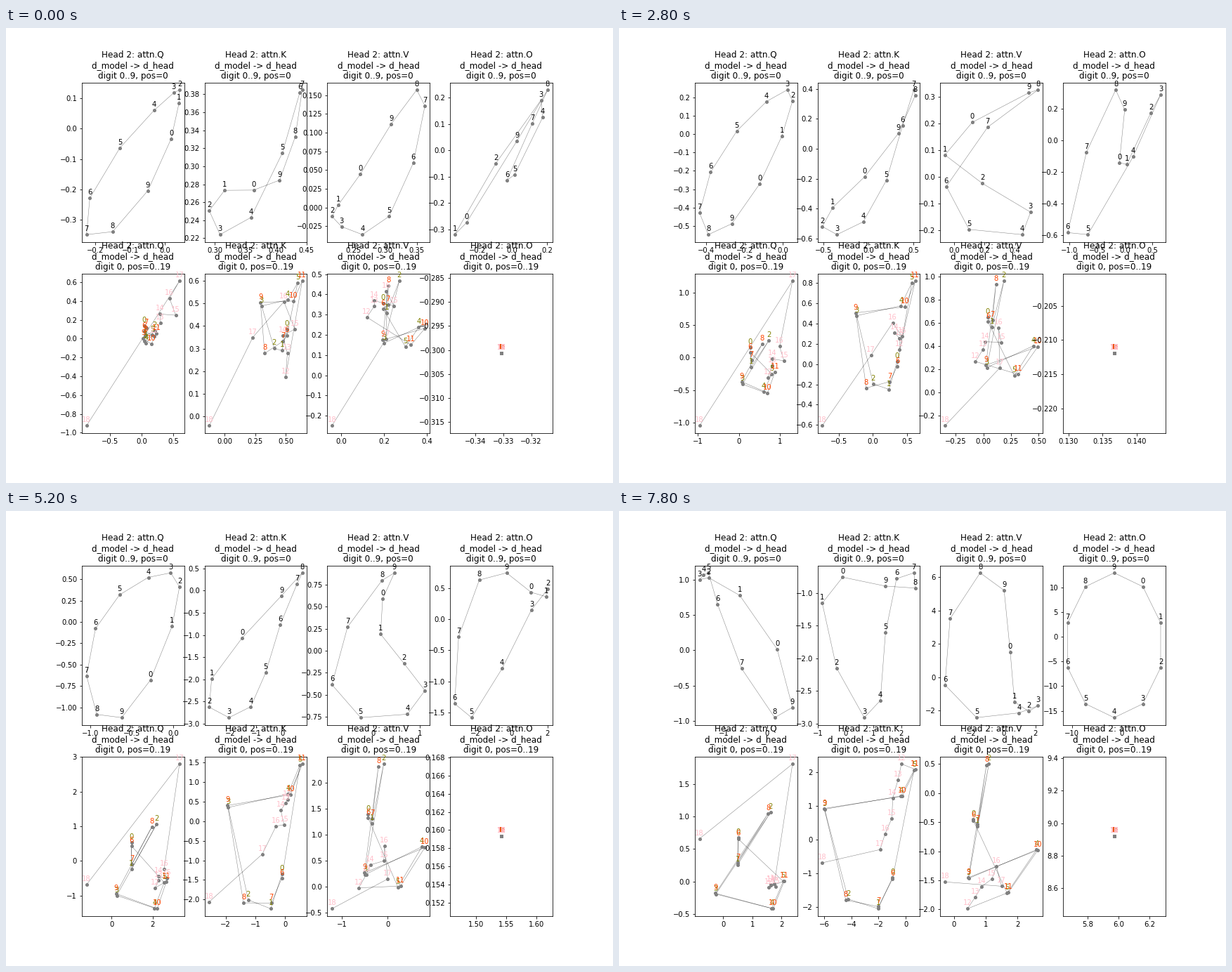
These frames come from a looping animation (864 by 648 pixels, 8 s). A matplotlib script:

```python
import matplotlib.pyplot as plt
import numpy as np
from matplotlib.animation import FuncAnimation

STEPS = 40
KEYS = (0, 22, 39)  # start, turning point and end of the loop
NAMES = "QKVO"


def wave(peak, ratio=0, peak2=0):
    """One cycle over the ten digits plus a weaker double cycle."""
    d = np.arange(10)
    turn = np.pi / 5
    return np.cos(turn * (d - peak)) + ratio * np.cos(2 * turn * (d - peak2))


def ring(x, y):
    return unit(wave(*x) + 1j * wave(*y))


def unit(z):
    """Stretch points to fill the unit square."""
    def norm(v):
        return (v - v.min()) / (np.ptp(v) or 1)
    return norm(z.real) + 1j * norm(z.imag)


# Shape of the digit ring at each key
RINGS = {
    "Q": (ring((1.6, .2, 4.1), (2.4, .14, 0)),
          ring((2.4, .06, 1.6), (3.5, .11, 1.7)),
          ring((8.9, .27, 4.2), (3.4, .36, .8))),
    "K": (ring((7, .14, -.2), (7, .5, 1.3)),
          ring((7.2, .22, 3.7), (7.8, .21, 3)),
          ring((6.6, .4, 3.2), (8.2, .5, .8))),
    "V": (ring((7, .05, 2.7), (8, .29, 2.6)),
          ring((1.9, 1.13, 3.4), (9.3, .11, 2.9)),
          ring((1.8, .43, 3.6), (8.3, .42, 3.2))),
    "O": (ring((5.7, 1.26, 3.2), (5.8, 2.2, 3.1)),
          ring((1.4, .07, 3.2), (.5, .64, 2.9)),
          ring((1.5,), (9,))),
}

# Data limits at each key: left, right, bottom, top
LIMITS = {
    "Q0": ((-.225, .042, -.348, .127), (-1.037, .07, -1.122, .569), (-1.555, .58, -.952, 1.094)),
    "K0": ((.291, .443, .224, .385), (-2.83, .745, -2.868, .418), (-.84, 2.5, -2.911, -.688)),
    "V0": ((.216, .363, -.036, .157), (-.853, 1.093, -.737, .814), (-3.64, 2.16, -2.43, 6.25)),
    "O0": ((-.331, .204, -.32, .229), (-3.05, 1.925, -1.391, .59), (-10.84, 7.94, -16.38, 12.93)),
    "Q1": ((-.876, .602, -.926, .613), (-1.212, 3.318, -1.396, 2.812), (-.803, 2.377, -.42, 1.806)),
    "K1": ((-.128, .636, -.04, .598), (-2.505, .572, -2.24, 1.457), (-6.15, .705, -2.045, 2.234)),
    "V1": ((-.043, .391, -.25, .467), (-1.229, .791, -.404, 2.382), (-.289, 2.65, -1.987, .5)),
    "O1": ((-.3307, -.3307, -.3007, -.3007), (1.483, 1.483, .0437, .0437), (5.972, 5.972, 8.919, 8.919)),
}


def chain(loop, tail, noise):
    """Twelve positions run twice round a loop, the other seven trail off."""
    path = np.interp(range(12, 19), (12, 16, 17, 18), tail)
    z = np.concatenate([loop, loop, path])
    rng = np.random.default_rng(4)
    z[:17] += noise * (rng.normal(size=17) + 1j * rng.normal(size=17))
    return unit(z)


def growth(center, scale, loop, early, late):
    """The loop starts as a small knot and opens to its full size."""
    loop = np.array(loop)
    knot = center + scale * (loop - loop.mean())
    return chain(knot, early, .03), chain(loop, late, .008)


CHAINS = {
    "Q": growth(.66 + .63j, .14,
                (.42 + .48j, .41 + .3j, .75 + .67j, .17 + .1j, .79, .9 + .18j),
                (.72 + .68j, .95 + .85j, 1 + 1j, 0),
                (.74 + .16j, .82 + .16j, 1 + 1j, .48j)),
    "K": growth(.75 + .63j, .4,
                (.77 + .2j, .61, .27 + .07j, .02 + .68j, .87 + .77j, 1 + .94j),
                (.78 + .35j, .83 + .7j, .45 + .52j, 0),
                (.86 + 1j, .7 + .5j, .63 + .4j, .31j)),
    "V": growth(.57 + .68j, .5,
                (.31 + .6j, .35 + .56j, .46 + 1j, .25 + .2j, 1 + .4j, .67 + .09j),
                (.3 + .75j, .54 + .82j, .48 + .55j, 0),
                (.24, .57 + .27j, .61 + .14j, .17j)),
    "O": (np.zeros(19, complex),) * 2,
}


def mix(a, b, t):
    return (1 - t) * a + t * b


def place(row, name, step):
    k = int(step >= KEYS[1])
    t = (step - KEYS[k]) / (KEYS[k + 1] - KEYS[k])
    if row == 0:
        z = mix(*RINGS[name][k:k + 2], t)
    else:
        z = mix(*CHAINS[name], step / KEYS[-1])
    z = unit(z)
    left, right, low, high = mix(*np.array(LIMITS[f"{name}{row}"])[k:k + 2], t ** 3)
    return left + (right - left) * z.real, low + (high - low) * z.imag


def label_color(row, i):
    if row == 0:
        return "black"
    return ("olive", "orangered", "pink")[min(i // 6, 2)]


class Panel:
    def __init__(self, ax, row, name):
        self.ax, self.row, self.name = ax, row, name
        span = "digit 0, pos=0..19" if row else "digit 0..9, pos=0"
        ax.set_title(f"Head 2: attn.{name}\nd_model -> d_head\n{span}")
        self.line, = ax.plot([], [], color="gray", lw=.5)
        self.dots, = ax.plot([], [], "o", color="gray", ms=4)
        self.labels = [ax.annotate(str(i), (0, 0), xytext=(0, 5),
                                   textcoords="offset points", ha="center",
                                   color=label_color(row, i))
                       for i in range(19 if row else 10)]

    def show(self, step):
        x, y = place(self.row, self.name, step)
        self.dots.set_data(x, y)
        if self.row == 0:
            self.line.set_data(np.append(x, x[0]), np.append(y, y[0]))
        else:
            self.line.set_data(x, y)
        for label, px, py in zip(self.labels, x, y):
            label.xy = px, py
        self.ax.relim()
        self.ax.autoscale_view()


fig, axes = plt.subplots(2, 4, figsize=(12, 9), dpi=72)
panels = [Panel(axes[row, col], row, name)
          for row in (0, 1) for col, name in enumerate(NAMES)]


def update(step):
    for panel in panels:
        panel.show(step)


anim = FuncAnimation(fig, update, frames=STEPS, init_func=lambda: update(0),
                     interval=200, repeat=True, repeat_delay=0)
plt.show()
```
